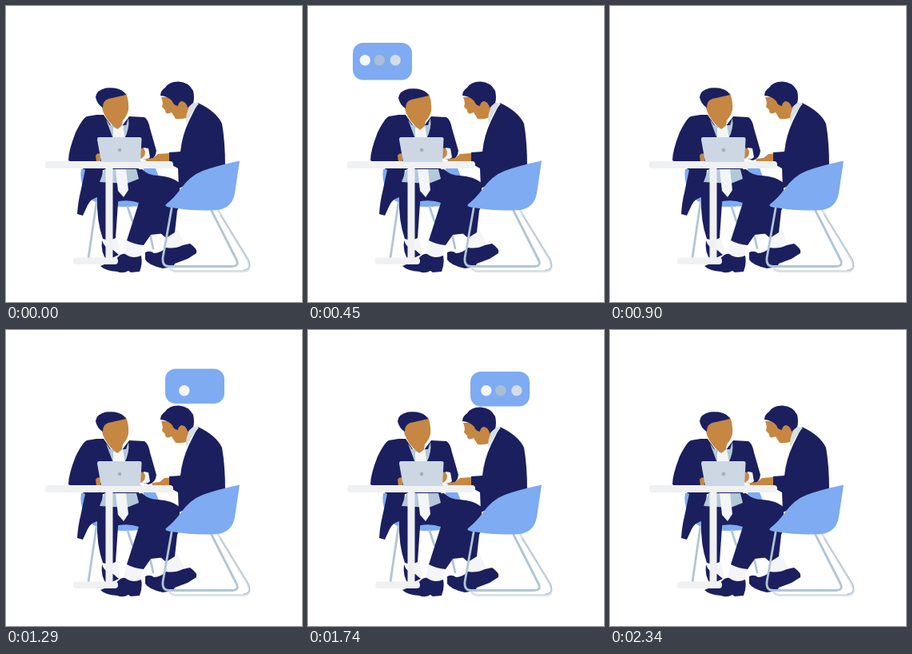
An HTML page that plays this animation: 370 by 370 pixels, repeating every 2370 ms.

```html
<!DOCTYPE html>
<html lang="en">
<head>
<meta charset="utf-8">
<title>Two people talking at a table</title>
<style>
html,body{margin:0;width:100%;height:100%;overflow:hidden;background:#fff}
svg{display:block;width:100vw;height:100vh}
.navy{fill:#1b1f5e}.skin{fill:#c58742}.blue{fill:#7eabf1}.pale{fill:#eff1f2}
.shirt{fill:#b3c8d9}.collar{fill:#d6dfe5}.sock{fill:#f3f5f6}
.leg{fill:none;stroke:#b1c5d6;stroke-width:2.8;stroke-linecap:round;stroke-linejoin:round}
</style>
</head>
<body>
<svg viewBox="0 0 370 370">
  <!-- far chair -->
  <path class="blue" d="M94 204H120V248Q103 244 97 229Q92 215 94 204Z"/>
  <path class="blue" d="M172 203H187L191 213L172 216Z"/>
  <path class="blue" d="M128 235H190V244Q178 251 145 251L128 250Z"/>
  <path class="leg" d="M113 246L103 315M172 250L184 303M152 251L158 269"/>

  <!-- left figure: far leg -->
  <path class="sock" d="M121 286L138 285L143 309Q133 317 124 309Z"/>
  <path class="navy" d="M114 230L141 232L137 290Q130 294 121 291Q113 268 114 239Z"/>
  <path class="navy" d="M120 293Q123 303 134 305L141 311L126 318Q118 308 120 293Z"/>

  <!-- right figure: far leg and shoe -->
  <path class="sock" d="M200 285L214 279L224 300Q212 306 200 304Z"/>
  <path class="navy" d="M174 308Q180 305 185 309Q193 309 200 302Q211 304 221 299L230 297Q240 304 238 309L227 316L211 322L209 326L196 328Q178 324 174 317Z"/>
  <path class="navy" d="M190 247H215L211 283L200 290L192 283Z"/>

  <!-- left figure: lap and near leg -->
  <path class="sock" d="M151 292L172 296L167 316Q156 319 147 311Z"/>
  <path class="navy" d="M117 214L150 205L170 204Q178 212 190 212Q207 213 217 221V250L199 284L181 286L172 299Q160 298 151 293L166 246Q155 242 141 244L117 248Z"/>
  <path class="navy" d="M118 325Q128 321 137 317Q144 308 149 310Q158 317 169 312Q171 322 167 332L156 333L153 331Q146 335 139 332Q124 331 118 325Z"/>

  <path class="navy" d="M101 138L113 136L122 136L138 159L154 138L173 139Q178 142 180 153L188 181Q187 191 178 193L168 190L166 205H121L118 238Q106 240 102 249L96 262L89 260Q90 245 93 233L99 205L78 193Q78 181 87 158Q96 140 101 138Z"/>
  <path class="shirt" d="M125 142L130 149L150 149L153 140Q155 153 148 166H134Z"/>
  <path class="sock" d="M134 152L141 153L146 149L149 166H134Z"/>
  <path class="shirt" d="M123 204H163L166 216L151 222L117 220Z"/>
  <path class="sock" d="M137 204H150L153 230L147 239L140 231Z"/>
  <path class="sock" d="M172 177L178 178L180 189Q176 194 168 190Z"/>
  <path class="skin" d="M112 187Q114 183 118 185V195H113ZM165 179Q172 175 174 182Q174 190 167 191Z"/>
  <g id="leftHead">
    <path class="skin" d="M120 117L150 109Q154 119 153 130Q151 138 146 143L145 149L139 154L131 147Q122 137 120 127Z"/>
    <path class="navy" d="M121 127Q114 123 112 114Q113 105 125 102.500Q141 101 148 108L150 111Q137 114 128 116Q121 118 121 127Z"/>
  </g>

  <!-- right figure -->
  <path id="hand" class="skin" d="M190 185L204 184V195H178Q173 194 175 191L184 190Z"/>
  <path class="navy" d="M240 121Q263 132 270 147Q274 170 274 201L236 219L216 228L215 203L204 197V183L218 182Q220 162 229 143Z"/>
  <path class="collar" d="M232 120L241 122Q230 135 226 147Q224 141 226 131Z"/>
  <g id="rightHead">
    <path class="skin" d="M194 114L218 113L232 121Q226 130 225 140Q218 142 212 141L207 133Q199 137 199 130L195 126Q197 121 194 114Z"/>
    <path class="navy" d="M193 112Q193 106 199 102Q204 94 216 94.500Q228 95 234 106Q236 115 234 121L227 127Q225 119 219 119Q215 121 215 125Q209 124 208 119Q203 113 193 112Z"/>
  </g>

  <!-- table and laptop -->
  <rect class="pale" x="124.5" y="202" width="9" height="114"/>
  <rect class="pale" x="84" y="314.5" width="56" height="8.5" rx="4"/>
  <rect class="pale" x="49" y="194" width="160" height="9" rx="4"/>
  <path fill="#ccd7e3" d="M116 164H167Q170 164 169.500 167L168 195H119L114 167Q114 164 116 164Z"/>
  <circle cx="142" cy="180" r="2.3" fill="#9dafc1"/>

  <!-- near chair -->
  <path class="leg" d="M207 253L196 315Q195 325.500 204 325.500H283Q292 325 288 317L257 256"/>
  <path class="leg" style="stroke:#dae1e6" d="M265 255L302 317Q308 331.500 297 331.500H212Q207 331 205 328"/>
  <path class="leg" style="stroke-width:1.300" d="M268 261L303 317Q308 329 297 330"/>
  <path class="blue" d="M292 193.500L286 234Q283 252 265 255Q237 257 207 252Q196 251 201 247Q210 240 218 229Q230 212 246 206Q262 200 292 193.500Z"/>

  <g id="leftTalk"></g>
  <g id="rightTalk"></g>
</svg>
<script>
const LOOP = 2370;
const $ = id => document.getElementById(id);
const clamp = x => Math.max(0, Math.min(1, x));
const ease = x => { x = clamp(x); return x * x * (3 - 2 * x); };
const pulse = (t, a, b, ramp) => ease((t - a) / ramp) * ease((b - t) / ramp);
const move = (el, x, y) => el.setAttribute("transform", `translate(${x.toFixed(2)} ${y.toFixed(2)})`);

function add(parent, name, attrs) {
  const el = document.createElementNS("http://www.w3.org/2000/svg", name);
  for (const k in attrs) el.setAttribute(k, attrs[k]);
  return parent.appendChild(el);
}

function makeTalk(id, o) {
  const group = $(id);
  const box = add(group, "rect", { width: 74, height: o.h, rx: 13, fill: "#7eabf1" });
  const dots = ["#f5f7f9", "#abbfd3", "#d3dde7"].map((fill, i) =>
    add(group, "circle", { cx: o.dotX + [0, 18, 38][i], cy: o.dotY, r: 6.7, fill }));
  return t => {
    const p = ease((t - o.settle) / 270);
    move(box, o.from[0] + (o.to[0] - o.from[0]) * p, o.from[1] + (o.to[1] - o.from[1]) * p);
    group.setAttribute("opacity", pulse(t, o.start, o.end, 90));
    dots.forEach((d, i) => d.setAttribute("opacity", ease((t - o.dots - i * 105) / 60)));
  };
}

const leftTalk = makeTalk("leftTalk", {
  h: 46.5, from: [59, 41], to: [56, 46], dotX: 71.3, dotY: 67.7,
  start: 60, end: 810, settle: 120, dots: 150
});
const rightTalk = makeTalk("rightTalk", {
  h: 43.5, from: [199, 48.5], to: [203, 52], dotX: 222.8, dotY: 75.7,
  start: 1110, end: 1980, settle: 1300, dots: 1210
});

function draw(t) {
  const leftNod = pulse(t, 120, 840, 240);
  const rightNod = pulse(t, 1320, 2010, 240);
  move($("leftHead"), leftNod, leftNod);
  move($("rightHead"), 0, rightNod * 2);
  move($("hand"), 8 * pulse(t, 640, 1560, 230), 0);
  leftTalk(t);
  rightTalk(t);
}

function tick() {
  draw(performance.now() % LOOP);
  requestAnimationFrame(tick);
}
tick();
</script>
</body>
</html>
```
